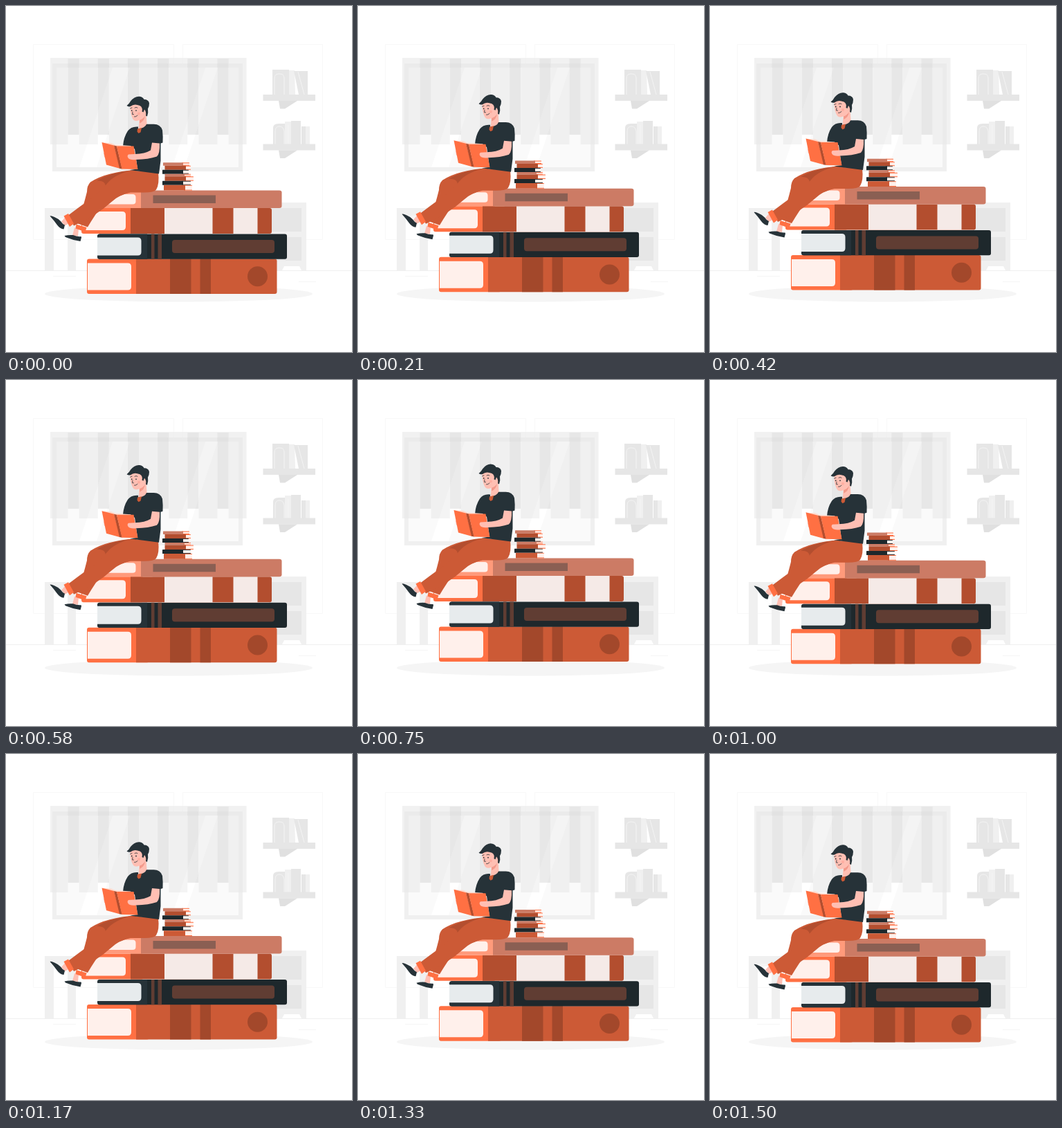
Animation, 500 px wide and 500 px high, one loop 1.54 s. Source, as an HTML page:

```html
<!DOCTYPE html>
<html lang="en">
<head>
<meta charset="utf-8">
<title>Reading on a stack of books</title>
<style>
html, body { margin: 0; width: 100%; height: 100%; overflow: hidden; background: #fff; }
svg { display: block; width: 100%; height: 100%; }
.ink { fill: #263238; }
.black { fill: #1e282c; }
.brown { fill: #603d33; }
.orange { fill: #ff7043; }
.rust { fill: #cc5a36; }
.dark { fill: #b34e2f; }
.deep { fill: #a3482b; }
.rose { fill: #cc7b65; }
.page { fill: #fff0eb; }
.skin { fill: #ffbfb3; }
.g1 { fill: #fafafa; }
.g2 { fill: #f0f0f0; }
.g3 { fill: #e6e6e6; }
.g4 { fill: #e0e0e0; }
.line { fill: none; stroke: #263238; stroke-width: .8; stroke-linecap: round; }
</style>
</head>
<body>
<svg viewBox="0 0 500 500">
  <g id="room">
    <g fill="none" stroke="#f8f8f8">
      <path d="M39.5 55.5H242.5V337.5H39.5ZM255.5 55.5H457.5V337.5H255.5Z"/>
      <path d="M0 382.5H500" stroke="#efefef"/>
      <path d="M423 398.5H448M68 390.5H101" stroke="#f5f5f5"/>
    </g>

    <path class="g2" d="M67 83H342V239H67Z"/>
    <path class="g1" d="M73 89H336V233H73Z"/>
    <path fill="#fff" d="M106 233L154 89H179L131 233ZM240 233L288 89H306L258 233Z"/>
    <g id="curtain" opacity=".92"></g>
    <path fill="#000" opacity=".018" d="M67 83H342V200H336V89H73V200H67Z"/>
    <path fill="#fff" opacity=".18" d="M117 200L154 89H179L142 200ZM251 200L288 89H306L269 200Z"/>

    <path class="g3" d="M385 92H409V128H385Z"/>
    <path class="g2" d="M409 93H417L418 128H409Z"/>
    <path class="g3" d="M416 94H436V128H423Z"/>
    <path fill="none" stroke="#f4f4f4" d="M388 128V104Q388 98 395 98T402 104V128M422 95L431 128"/>
    <path class="g3" d="M386 200V176Q386 170 394 170H403V200Z"/>
    <path class="g2" d="M403 167H414V200H403Z"/>
    <path class="g3" d="M412 166H426V200H412ZM427 174H433V200H427Z"/>
    <path class="g2" d="M433 174H439V200H433Z"/>
    <path fill="none" stroke="#f4f4f4" d="M389 200V181Q389 174 395 174T402 181V200M408 172V200"/>
    <path class="g3" d="M371.500 128H447V137H371.500ZM371.500 199.500H447V208.500H371.500Z"/>
    <path class="g4" d="M394 137H421L403 148.500H396ZM394 208.500H421L403 220H396Z"/>

    <path class="g2" d="M56 292H120V303H101V382H89V303H69V382H56Z"/>
    <path fill="#f5f5f5" d="M69 303H89V307H69Z"/>
    <path class="g2" d="M380 284H434V382H427L424 376H402L399 382H380Z"/>
    <path class="g3" d="M380 292H427V326H380ZM380 334H427V368H380Z"/>
    <ellipse cx="249.500" cy="416" rx="193.500" ry="11.500" fill="#f5f5f5"/>
  </g>

  <g id="float">
    <!-- large books, bottom to top -->
    <rect class="orange" x="117" y="366" width="90" height="50.500" rx="3"/>
    <path class="rust" d="M188 366H388.500Q391.500 366 391.500 369V413.500Q391.500 416.500 388.500 416.500H188Z"/>
    <path class="page" d="M118 372H176Q181 372 181 377V406Q181 411 176 411H118Z"/>
    <path class="deep" d="M237 366H267.500V416.500H237ZM280.500 366H296V416.500H280.500Z"/>
    <circle class="deep" cx="363.500" cy="391.300" r="14.500"/>

    <rect class="black" x="132" y="330" width="274" height="36.300" rx="3"/>
    <path class="ink" d="M135 330H204V366.300H135L132 363V333Z"/>
    <path fill="#e7ebed" d="M132 335H190.500Q195.500 335 195.500 340V356Q195.500 361 190.500 361H132Z"/>
    <path class="brown" d="M210 330H214.500V366.300H210ZM219.500 330H225V366.300H219.500Z"/>
    <rect class="brown" x="240" y="338.500" width="148" height="19" rx="4"/>

    <rect class="orange" x="109" y="292.500" width="90" height="37" rx="3"/>
    <path class="dark" d="M180 292.500H381Q384 292.500 384 295.500V326.500Q384 329.500 381 329.500H180Z"/>
    <path class="page" d="M110 297.500H168Q173 297.500 173 302.500V319.500Q173 324.500 168 324.500H110Z"/>
    <path fill="#f5eae7" d="M229 292.500H298.500V329.500H229ZM328.500 292.500H363.500V329.500H328.500Z"/>

    <rect fill="#ff9a7b" x="124" y="267" width="90" height="25.500" rx="3"/>
    <path class="rose" d="M195 267H395Q398.500 267 398.500 270V289.500Q398.500 292.500 395 292.500H195Z"/>
    <path class="page" d="M125 272.500H183Q187.500 272.500 187.500 277V283Q187.500 287 183 287H125Z"/>
    <path fill="#8a5f53" d="M212.500 274H303V285.500H212.500Z"/>

    <g id="smallBooks"></g>

    <!-- far leg -->
    <path class="skin" d="M99 321L105 323L104 333L96 332Z"/>
    <path class="ink" d="M84.500 332.500Q90 331 97 331.500Q102 334 108.500 333.500L109 335L107.500 340.500Q97 339 86 334.500Z"/>
    <path class="rust" d="M188 237.500Q145 240 122 255Q117 260 117 269Q112 289 104 315L118 320Q128 303 142 284L190 265Z"/>
    <path class="orange" d="M101.500 316L116.500 320.500L114.500 327L100.500 322Z"/>
    <path class="dark" d="M190 237.500Q152 240 131 253Q145 252 144 264L170 253Z"/>

    <!-- near leg -->
    <path class="skin" d="M87 304L92 314L85 318L80 312Z"/>
    <path class="ink" d="M63.500 304Q65 303 70 305.500Q76 308 79 311.500Q82 316 85 317L83.500 323Q78 322.500 74 317Q69 310 63.500 304Z"/>
    <path class="rust" d="M180 238L220 241Q222 258 217 266Q214 270 200 270H180Q165 272 152 284Q130 304 98 318L90 303Q111 287 120 281Q138 267 147 256Q156 245 180 238Z"/>
    <path class="orange" d="M83.500 304L90 300.500L98 315L92 319.500Z"/>

    <!-- head -->
    <path class="skin" d="M193 162L191.500 179Q200 178 203.500 171L202.500 155Z"/>
    <path fill="#f39a8b" d="M193 165Q198 164 201 159Q200 167 193 170Z"/>
    <path class="skin" d="M179.500 144Q179 153 182 161Q184 167 189 166.500Q198 165 201 158Q205 158 205 153Q204 150 201 151L199 142L186 139Z"/>
    <path class="ink" d="M174.500 144.500Q178 142 180 138Q186 130.500 193 131.200Q198 132 199.500 135.500Q206 135.500 207 141Q207 146 205 149Q206 154 204 160L202 159Q203 153 200 150L198.500 154L196.500 153Q198 147 193.500 144.500Q185 141 180 145.500Q177 146.500 174.500 144.500Z"/>
    <path class="line" d="M179.500 148.500L182 147.500M186 147.500Q188 146 190 147.500M183 153.500L182.500 157L184.500 157M185.500 160.500Q188 161 190 158.500"/>
    <circle class="ink" cx="181.700" cy="151.500" r=".9"/>
    <circle class="ink" cx="188" cy="151.500" r=".9"/>
    <circle cx="192" cy="156" r="2" fill="#ff9c8d" opacity=".5"/>

    <!-- torso -->
    <path class="ink" d="M191 175Q181 174 176 181Q170 190 169 203L186 207L190 236L179 237.500L221 243L223.500 224L223.500 199L226.500 198Q227 189 226 180Q223 171 213 171.300H203Q201 177 191 178Z"/>
    <path class="rust" d="M190 178L196 176.500L194.500 183L191.500 184.500L189.500 182Z"/>

    <!-- open book -->
    <path fill="#ffd9cc" d="M139 198L152 198.500L158 201L180 202.500L184 206L158 210Z"/>
    <path class="skin" d="M144 211L141 213L142 219L146 219Z"/>
    <path class="orange" d="M138.500 197.500L156 202L165 235.500L145 230Z"/>
    <path class="dark" d="M156 202L160 203L168 236L164 235.300Z"/>
    <path class="orange" d="M160 203H184.500L190.500 236.500L167.500 236Z"/>

    <path class="skin" d="M211 198L222 199Q222.500 214 218 218Q206 222 188 222.500Q179 223.500 176.500 220Q174.500 217 177 215L186 214.500Q201 214 209 209Z"/>
  </g>
</svg>
<script>
const svgNS = "http://www.w3.org/2000/svg";
const float = document.getElementById("float");
const curtain = document.getElementById("curtain");
const smallBooks = document.getElementById("smallBooks");

function addRect(parent, className, x, y, width, height, rx = 0) {
  const rect = document.createElementNS(svgNS, "rect");
  const attributes = { class: className, x, y, width, height, rx };
  for (const name in attributes) rect.setAttribute(name, attributes[name]);
  parent.append(rect);
}

addRect(curtain, "g2", 64, 75, 283.5, 8);
for (let i = 0; i < 7; i++) {
  const x = 62.5 + i * 43.2;
  const left = Math.max(x, 64);
  addRect(curtain, "g2", left, 83, Math.min(x + 27, 347.5) - left, 117);
  if (i < 6) addRect(curtain, "g3", x + 27, 76, 16.2, 110);
}

// cover class, left, top, height, start of pages, right
const volumes = [
  ["rose", 227, 226.8, 4.4, 256, 265],
  ["dark", 229.5, 231.2, 6, 260, 267],
  ["black", 226, 237.2, 6, 256, 264],
  ["rose", 229.5, 243.2, 3.6, 258, 267],
  ["dark", 229.5, 246.8, 6.4, 260, 271],
  ["black", 226, 253.2, 6, 256, 267],
  ["rust", 228, 259.2, 7.8, 259, 269]
];
for (const [cover, left, top, height, pages, right] of volumes) {
  addRect(smallBooks, cover === "black" ? "ink" : "orange", pages - 2, top, right - pages + 2, height, 0.5);
  addRect(smallBooks, "page", pages, top + 1, right - pages, height - 2);
  addRect(smallBooks, cover, left, top, pages - left, height, 0.5);
}

const LOOP = 1540;
const STEP = 41.65;
const HALF = 18; // steps from lowest to highest point
const RISE = 10;

function draw() {
  const step = Math.floor((performance.now() % LOOP + 4) / STEP);
  const phase = (step + 0.8) / HALF;
  const lift = Math.max(0, RISE * (1 - Math.abs(1 - phase)));
  float.setAttribute("transform", `translate(0 ${-lift})`);
  requestAnimationFrame(draw);
}
draw();
</script>
</body>
</html>
```
